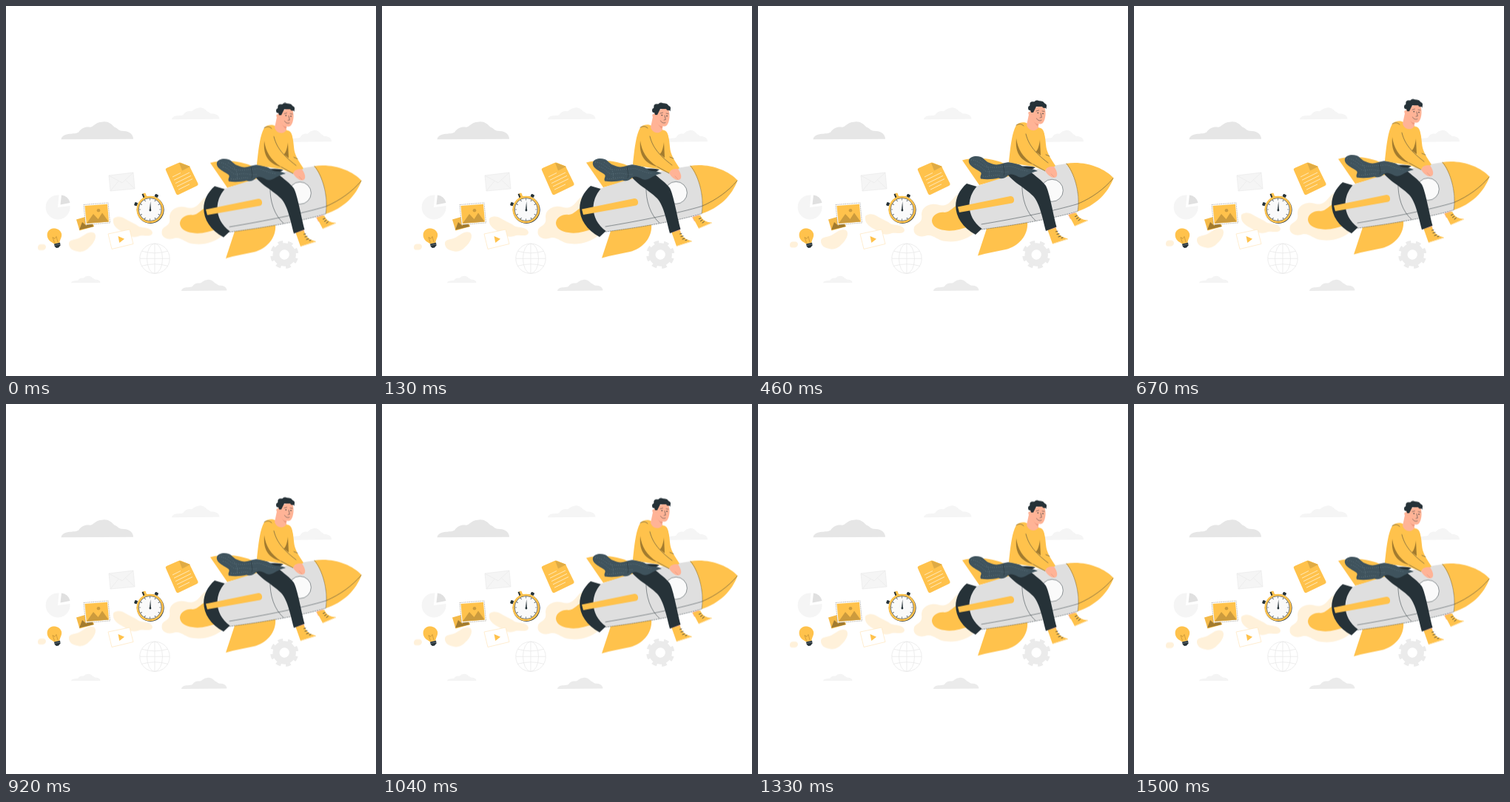
Animation of 500 by 500 pixels, one loop 1.54 s. Source, as an HTML page:

```html
<!DOCTYPE html>
<html lang="en">
<head>
<meta charset="utf-8">
<title>Rocket ride</title>
<style>
  html, body { margin: 0; width: 100%; height: 100%; overflow: hidden; background: #fff; }
  svg { display: block; width: 100vw; height: 100vh; }
  .y { fill: #ffc24c; }
  .d { fill: #263238; }
  .skin { fill: #ffb396; }
  .smoke { fill: #fff1da; }
  .shade { fill: #a27b2f; }
  .line { fill: none; stroke: #263238; stroke-width: .5; stroke-linecap: round; }
  .lace { stroke-width: .8; }
  .grey { fill: none; stroke: #e9e9e9; stroke-width: .8; }
</style>
</head>
<body>
<svg viewBox="0 0 500 500">
  <defs>
    <path id="cloud" d="M0 24.500C1 19 7 17 14 17C18 16 20 17 24 15C28 9 34 7 40 8C45 8 46 2 56 1C64-1 69 3 74 8C78 9 80 13 84 13C92 13 100 16 100 24Z"/>
  </defs>

  <!-- backdrop -->
  <use href="#cloud" transform="translate(74.5 155.7) scale(.975 1)" fill="#e6e6e6"/>
  <use href="#cloud" transform="translate(224 137) scale(.645 .66)" fill="#f5f5f5"/>
  <use href="#cloud" transform="translate(384 167.5) scale(.56 .66)" fill="#f5f5f5"/>
  <use href="#cloud" transform="translate(88 364.5) scale(.395 .4)" fill="#f4f4f4"/>
  <use href="#cloud" transform="translate(237 369.5) scale(.615 .63)" fill="#ebebeb"/>

  <g stroke="#e8e8e8" stroke-width=".6" fill="#f5f5f5" stroke-linejoin="round">
    <path d="M139 229L172 225L174 247L141 250Z"/>
    <path d="M139 229L157 239L172 225M141 250L152 236.500M174 247L161.500 235" fill="none"/>
  </g>
  <path d="M70 272L71.500 255.500A16.500 16.500 0 1 0 86.500 270Z" fill="#f5f5f5"/>
  <path d="M73.500 268.500L75 255.500A13 13 0 0 1 86.500 266Z" fill="#e0e0e0"/>

  <g class="grey" transform="translate(201 341.300)">
    <circle r="20.200"/>
    <ellipse rx="10.500" ry="20.200"/>
    <path d="M0-20V20M-20 0H20M-17.500-10Q0-5 17.500-10M-17.500 10Q0 5 17.500 10"/>
  </g>

  <g transform="translate(376.200 336) rotate(16)" fill="none" stroke="#ebebeb">
    <circle r="11.200" stroke-width="9"/>
    <circle r="16.800" stroke-width="4.600" pathLength="16" stroke-dasharray="1 1"/>
  </g>

  <g class="bob">
    <path class="smoke" d="M269 258C262 264 260 270 253 272C246 274 242 270 235 271C227 272 221 277 221 285C223 297 214 296 211 302C208 312 218 317 229 313C238 312 242 320 254 321C268 323 282 318 291 311L300 280Z"/>
    <path class="smoke" d="M145 287C149 283 155 284 159 286C164 289 170 292 176 295C181 300 188 298 194 301C200 304 199 310 192 310C186 310 182 309 178 311C170 313 164 310 160 306C154 303 143 298 145 287Z"/>
    <path class="smoke" d="M85 322C84 315 92 316 99 313C106 309 112 303 119 306C124 310 119 320 113 325C108 331 101 333 96 331C91 330 86 328 85 322Z"/>
    <path class="smoke" d="M43 326C43 322 46 321 49 321.500C53 321 55 324 53.500 327C52 330 49 329.500 47 329.500C44 330 43 328.500 43 326Z"/>
    <path class="y" d="M235 293C236 285 244 281 252 282C260 282 265 272 273 271L287 300C275 305 262 308 252 306C242 305 235 300 235 293Z"/>
  </g>

  <!-- icons -->
  <path class="y" d="M61.500 319C55 316 53.500 306 59 302.500C64 298.500 73 301 75 307.500C76 313 72.500 315 72.500 320L65 321.500Z"/>
  <path d="M65.500 320L63 312.500L66 314.500L68 311.500L70 319" fill="none" stroke="#b48532" stroke-width=".6"/>
  <path class="d" d="M65 321.500L73 319.700L73.500 323.500L71 326.500L68 327L65.800 325Z"/>
  <path d="M65.500 323.500L73.500 321.700" stroke="#8f989c" stroke-width=".6"/>

  <path d="M95 288.500L114 283L119 298L99.500 303.500Z" fill="#f5ba49"/>
  <path d="M99 302.500L103 292L108.500 297L113 290L118.500 298Z" class="shade"/>
  <path d="M105 268.500L138 266L140.500 293L107.500 295.500Z" fill="#fff" stroke="#8b877f" stroke-width=".6" stroke-dasharray="1.500 1"/>
  <path class="y" d="M106.500 270L137 267.700L139 291.500L108.700 294Z"/>
  <path d="M109 293.700L118 281L124.500 288L130 279.500L138.700 291.400Z" fill="#cc9b3d"/>
  <circle cx="125" cy="276.300" r="2.300" fill="#cc9b3d"/>

  <g transform="translate(194.700 275)">
    <rect class="y" x="-2.500" y="-23.500" width="5" height="7" rx="1" transform="rotate(-22)"/>
    <path class="d" d="M-2.500-23.500H-.5V-17H-2.500Z" transform="rotate(-22)"/>
    <rect class="d" x="-2.300" y="-22.500" width="4.600" height="4" rx="1" transform="rotate(25)"/>
    <rect class="d" x="-2.300" y="-22.500" width="4.600" height="4" rx="1" transform="rotate(-69)"/>
    <circle r="18.400" class="d" cx=".5" cy=".5"/>
    <circle r="18.300" class="y"/>
    <circle r="15.500" fill="#fafafa" stroke="#263238" stroke-width=".6"/>
    <circle r="13.700" fill="none" stroke="#263238" stroke-width="2.200" pathLength="48" stroke-dasharray=".4 3.600" stroke-dashoffset=".2"/>
    <path d="M-.8 1L.5-11L1.200 1Z" class="d"/>
    <circle r="1.400" class="d" cx=".2" cy="1"/>
  </g>

  <path class="y" d="M216 222Q215 220 217 219L233 212Q235 211 237 212L248 216.500L259.500 240Q260 242 258 243L233 255Q231 256 229.800 253.500Z"/>
  <path d="M234 211.700L249 217L238 222.500Z" fill="#dfab44"/>
  <path d="M225 231L236 225.500M227 235.300L248 225M229 239.600L250 229.300M231 243.900L252 233.600M233 248.200L248 240.800" stroke="#fff1d3" stroke-width=".8"/>

  <path d="M138 308L167 302L172 321.500L143 328.500Z" fill="#fff" stroke="#ffe9c4" stroke-width=".8" stroke-linejoin="round"/>
  <path class="y" d="M151.500 311L160 314.700L153.300 320Z"/>

  <g class="bob">
    <!-- rocket -->
    <path class="y" d="M276 211.500C294 206 320 209 335 217L348 232L299 245Z"/>
    <path class="y" d="M309 304L364 294C366 314 351 328 335 332C322 335 309 337 297 340.500Z"/>
    <path d="M294 247C330 235 370 223 417 216C427 228 436 256 432 280.500C400 290 350 299 302 305C285 298 279 268 294 247Z" fill="#dfdfdf"/>
    <path class="d" d="M282 243L295.500 247C280 265 283 290 302.500 304L294 312C264 296 258 264 282 243Z"/>
    <path class="y" d="M416 216C441 212 467 221 480.500 235.500C473 256 456 273 432 280.500C436 256 427 228 416 216Z"/>
    <path class="line" d="M302 298C350 290 400 280 432 270.500C452 262 468 250 480 236"/>
    <path class="line" d="M302 305C350 299 400 290 432 280.500" stroke-dasharray="1.500 1.500"/>
    <path class="line" d="M357 243C356 263 363 283 375 293"/>
    <path class="line" d="M417 216C427 228 436 256 432 280.500" stroke-dasharray=".8 1.400"/>
    <circle cx="397.300" cy="252.300" r="15" fill="#fafafa" stroke="#263238" stroke-width=".5"/>
    <path class="y" d="M270 274.500L341 260A5 5 0 0 1 343 269.600L272 282Z"/>

    <!-- shoes -->
    <path class="skin" d="M419 285L428 282L431 288L422 291Z"/>
    <path class="y" d="M420 285.500L430 282.500C433 289 437 292 446 292.500L428 300.500Z"/>
    <path class="line lace" d="M428.500 287.500L431 286.500M430.500 290.500L433 289M433 293L435.500 291"/>
    <path d="M428 300.500L446 293" stroke="#ffe3ae" stroke-width="1"/>
    <path class="skin" d="M390 304L402 300L404 307L394 310Z"/>
    <path class="y" d="M391.500 306L402.500 303C405 312 411 316 419 317.500L398 324.500Z"/>
    <path class="line lace" d="M402.500 308L405 307.300M404 311.500L407 310.700M406 315L409 314M410 316.500L412 316"/>
    <path d="M398 324.500L419 318" stroke="#ffe3ae" stroke-width="1"/>

    <!-- rider -->
    <path class="d" d="M333 223C338 220 362 218 375 221L367 226C374 232 385 240 389 246C394 255 399 285 403.500 301.500L389 307C385 292 381 270 372 260C366 254 356 247 349 242C342 236 335 230 333 223Z"/>
    <path d="M285 211C287 206 295 205 301 207C306 209 307 213 313 215C319 218 324 218 330 216C338 213 346 214 352 217C358 219 360 223 366 223C371 223 374 224 378 226C373 227 371 228 367 230C361 233 358 236 352 234C346 231 342 229 338 232C334 236 329 237 325 235.500C318 237 310 238 301 236.500C299 232 304 230 300 227C295 223 283 219 285 211Z" fill="#3f535d"/>
    <g fill="none" stroke="#70858f" stroke-width=".6" stroke-dasharray="1 1.800">
      <path d="M288 211C300 211 302 221 313 221C322 222 328 220 337 220C346 218 353 226 366 226"/>
      <path d="M293 217C304 219 304 228 313 227C325 224 330 229 339 227"/>
      <path d="M304 233C312 235 320 230 327 232M300 211C310 217 314 224 312 234"/>
    </g>
    <path class="line" d="M332 217C330 222 335 226 332 232"/>

    <path class="y" d="M380 168C388 170 388 181 389.500 194C391 203 397 211 402 219L393 225L382 205Z"/>
    <path class="y" d="M350 163C343 172 341 196 339 214C350 217 362 218 373 220L388 226L394 217L382 205C387 198 388 186 387 177C386 170 384 168 378 167L361 160.500C356 160 353 161 350 163Z"/>
    <path class="shade" d="M349 182C351 196 357 207 372 217C357 213 347 204 349 182Z"/>
    <path class="shade" d="M381 184C380 192 378 198 375.500 200L382 205Z"/>
    <path class="line" d="M349 164C353 162 356 162 359 165M362 176C365 188 371 199 392 215M372 217L388 226M389 204L394 206"/>
    <path class="skin" d="M388 226C391 219 396 220 400 220C403 224 406 231 403 234C398 237 392 232 388 226Z"/>
    <path class="line" d="M396 230L400 234" style="stroke:#d88c76"/>

    <path class="skin" d="M367 145L363 164C366 173 376 173 379 167L379 157Z"/>
    <path class="skin" d="M368 142L386 137C390 144 389 156 385 161C379 166 370 158 368 149Z"/>
    <path d="M371 157C373 160 376 163 380 163L377 165Z" fill="#ee997f"/>
    <g class="d">
      <path d="M367 139C368 130 386 128 389 137L390 142L386 139L376 139L372 147L369 147Z"/>
      <circle cx="368.300" cy="141" r="3.300"/>
      <circle cx="371" cy="136" r="3.700"/>
      <circle cx="377" cy="134" r="3.500"/>
      <circle cx="383" cy="135" r="3.300"/>
      <circle cx="387" cy="138" r="3"/>
      <circle cx="378.300" cy="147.500" r=".8"/>
      <circle cx="385" cy="148.500" r=".8"/>
    </g>
    <path class="line" d="M376 145L379.500 144M384 145L387 145.500M382 148L383.300 153.500L381 154M376.500 155C378 158 381 158.500 383 157.500"/>
    <path class="skin" d="M367 146C364 145 365 152 369 151Z"/>
  </g>
</svg>
<script>
  const LOOP = 1540, LOW = .5, HIGH = -5;
  const rise = [LOW, HIGH].map(y => ({ transform: `translateY(${y}px)` }));
  for (const el of document.querySelectorAll('.bob')) {
    const anim = el.animate(rise, {
      duration: LOOP / 2,
      easing: 'cubic-bezier(.37, 0, .63, 1)',
      direction: 'alternate',
      iterations: Infinity
    });
    anim.startTime = 0;
  }
</script>
</body>
</html>
```
